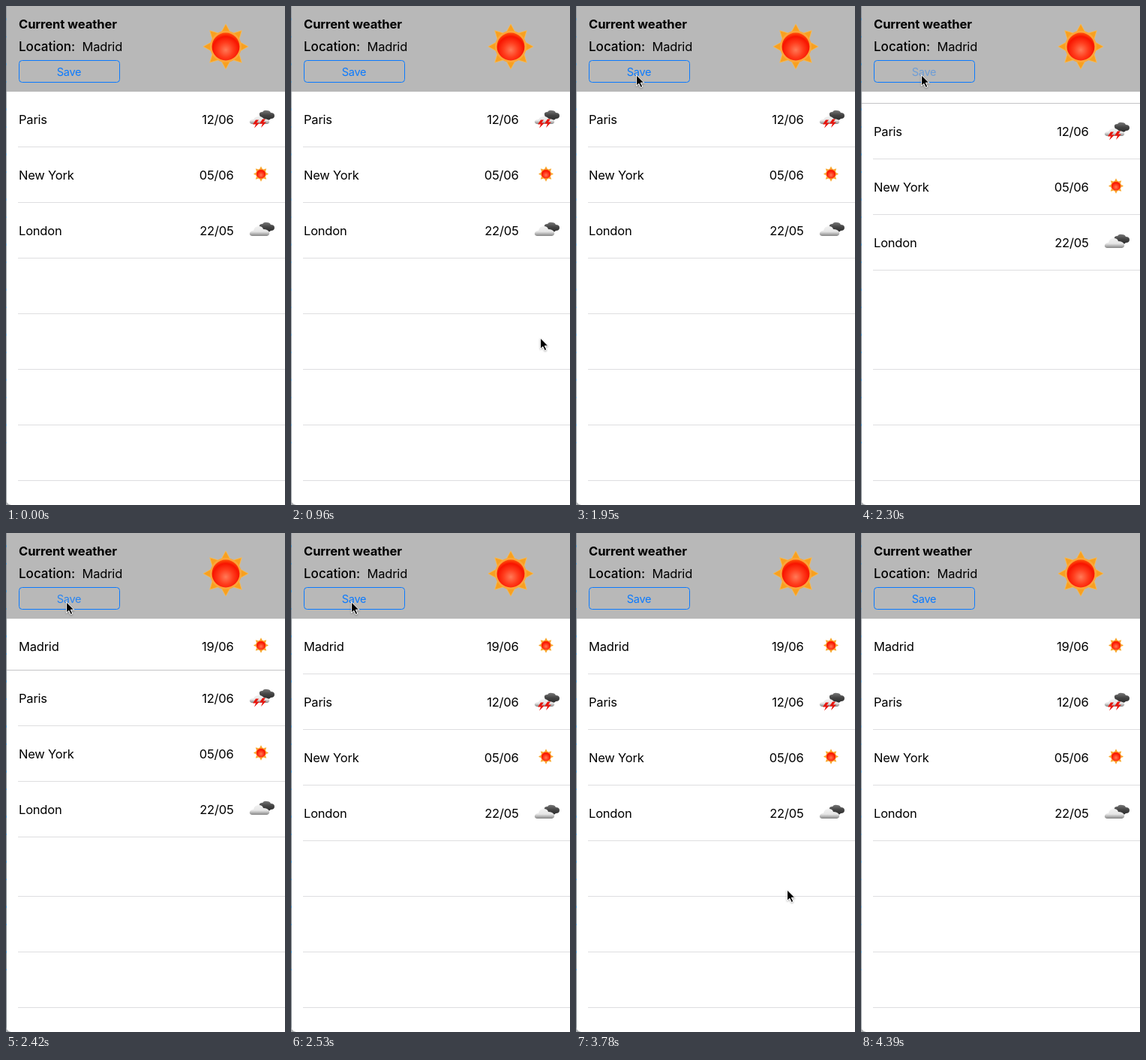
Animation, 372 px wide and 664 px high, one loop 4.49 s. Source, as an HTML page:

```html
<!DOCTYPE html>
<html lang="en">
<head>
<meta charset="utf-8">
<title>Weather list</title>
<style>
  html, body { margin: 0; width: 100%; height: 100%; overflow: hidden; background: #fff; }
  svg { display: block; width: 372px; height: 664px; }
  text { font: 400 16.5px Inter, Roboto, "Liberation Sans", sans-serif; letter-spacing: -.2px; fill: #000; }
  .title { font-weight: 700; font-size: 16.6px; letter-spacing: -.12px; }
  .label { font-weight: 500; font-size: 17px; letter-spacing: 0; }
  .date, .icon-end { text-anchor: end; }
  #save { font-size: 14.5px; letter-spacing: -.3px; text-anchor: middle; fill: #0a7aff; }
  .line { fill: #dedee0; }
</style>
</head>
<body>
<svg viewBox="0 0 372 664">
  <defs>
    <radialGradient id="glow" cx=".5" cy=".62" r=".6">
      <stop offset="0" stop-color="#ff7a58"/>
      <stop offset=".45" stop-color="#ff3c1c"/>
      <stop offset=".8" stop-color="#f81400"/>
      <stop offset="1" stop-color="#ff4a08"/>
    </radialGradient>
    <linearGradient id="dark" x2="0" y2="1">
      <stop offset="0" stop-color="#777"/>
      <stop offset=".5" stop-color="#444"/>
      <stop offset="1" stop-color="#2c2c2c"/>
    </linearGradient>
    <linearGradient id="pale" x2="0" y2="1">
      <stop offset="0" stop-color="#f2f2f2"/>
      <stop offset=".55" stop-color="#e6e6e6"/>
      <stop offset="1" stop-color="#858585"/>
    </linearGradient>
    <filter id="soft"><feGaussianBlur stdDeviation=".6"/></filter>
    <filter id="shade" x="-50%" y="-50%" width="200%" height="200%">
      <feDropShadow dx="0" dy="1" stdDeviation="1" flood-opacity=".35"/>
    </filter>

    <path id="rays" d="M0-30 5.5-20h-11zM0 30 5.5 20h-11z" fill="#f8a020" stroke="#fbbc50" stroke-width=".8"/>
    <g id="sun">
      <use href="#rays"/>
      <use href="#rays" transform="rotate(45)"/>
      <use href="#rays" transform="rotate(90)"/>
      <use href="#rays" transform="rotate(135)"/>
      <circle r="21" fill="#fba63a"/>
      <circle r="18.5" fill="url(#glow)"/>
    </g>
    <g id="small-sun" transform="translate(340 35.5) scale(.33)"><use href="#sun"/></g>
    <path id="back-cloud" fill="url(#dark)"
      d="M338 31q-1-4 4-4 2-3 6-2 4 0 5 3 5 0 5 4 0 4-5 4-2 3-6 1-3 1-4-2-4 0-5-4z"/>
    <g id="cloud">
      <use href="#back-cloud" y="1"/>
      <path fill="url(#pale)" d="M328 44q-4-1-3-4 1-3 5-3 1-6 7-6 5 0 6 4 6 0 8 4 1 4-3 5z"/>
    </g>
    <g id="storm">
      <use href="#back-cloud"/>
      <path fill="url(#pale)" d="M328 43q-4-1-3-4 1-2 5-2 2-4 7-4 5 0 6 3 6 0 8 3 1 3-3 4z"/>
      <path fill="#e8140c" d="M333 37.500l-4 6h4l-2 5 7-7h-4l3-4zM342 36.500l-4 6h4l-2 5.500 7-7.500h-4l3-4z"/>
    </g>
  </defs>

  <rect width="372" height="664" fill="#fff"/>
  <g id="empty"></g>
  <g id="added"></g>
  <g id="list"></g>

  <rect width="372" height="114" fill="#b8b8b8"/>
  <text class="title" x="17" y="30">Current weather</text>
  <text class="label" x="17" y="59.500">Location:</text>
  <text x="101.500" y="59.500">Madrid</text>
  <rect x="17.500" y="72.500" width="134" height="29" rx="4" fill="none" stroke="#0a7aff"/>
  <text id="save" x="84" y="92.500">Save</text>
  <use href="#sun" transform="translate(293 54)" filter="url(#soft)"/>

  <g id="edge">
    <path d="M.5 0V664" stroke="#8c9298"/>
    <path d="M.5 16V600" stroke="#4f93c4" stroke-dasharray="3 21 2 34"/>
  </g>
  <path d="M0 657q1 6 7 7H0z" fill="#a4a7aa"/>

  <g id="cursor" filter="url(#shade)">
    <path d="M.6.9V15.200l3.200-3 2.500 5.300 2.500-1.200-2.500-5.100h4.500z" stroke="#fff"/>
  </g>
</svg>
<script>
  const LOOP = 4490, ROW = 74, TOP = 114;
  const $ = id => document.getElementById(id);

  const line = (y, x = 16) => `<rect class="line" x="${x}" y="${y}" width="${372 - x}" height="1"/>`;
  const row = (i, city, date, icon) => `
    <g transform="translate(0 ${TOP + ROW * i})">
      <rect width="372" height="${ROW}" fill="#fff"/>
      <text x="17" y="42.500">${city}</text>
      <text class="date" x="303.500" y="42.500">${date}</text>
      <use href="#${icon}"/>
      ${line(ROW - 1)}
    </g>`;

  $('empty').innerHTML =
    `<g id="fourth">${line(409)}</g>` + [483, 557, 631].map(y => line(y)).join('');
  $('added').innerHTML = row(0, 'Madrid', '19/06', 'small-sun');
  $('list').innerHTML =
    row(0, 'Paris', '12/06', 'storm') +
    row(1, 'New York', '05/06', 'small-sun') +
    row(2, 'London', '22/05', 'cloud') +
    `<rect id="rim" y="${TOP - 1}" width="372" height="1" fill="#c4c4c6"/>`;

  // Bursts of motion: start, end, number of updates
  const bursts = [[960, 1480, 10], [1530, 1950, 7], [2120, 2530, 8], [3430, 3900, 9]];
  const snap = t => {
    for (const [a, b, n] of bursts) {
      const step = (b - a) / (n - 1);
      if (t >= a && t < b + step) return a + step * Math.min(n - 1, Math.floor((t - a) / step));
    }
    return t;
  };

  const part = (t, a, b) => Math.min(1, Math.max(0, (t - a) / (b - a)));
  const smooth = p => p * p * (3 - 2 * p);
  const mix = (a, b, p) => a + (b - a) * p;

  // Pointer legs: start, end, from x, y, to x, y
  const legs = [
    [960, 1480, 332, 441, 80, 107],
    [1480, 1950, 80, 107, 80, 91],
    [3430, 3900, 94, 105, 367, 645]
  ];
  const pointer = t => {
    if (t >= 1950 && t < 3430) return [80, 91];
    const [a, b, x0, y0, x1, y1] = legs.findLast(leg => t >= leg[0]);
    const p = smooth(part(t, a, b));
    return [Math.round(mix(x0, x1, p)), Math.round(mix(y0, y1, p))];
  };

  const show = (id, on) => $(id).setAttribute('visibility', on ? 'visible' : 'hidden');

  function draw(time) {
    const t = snap(time);
    const shift = Math.round(ROW * smooth(part(t, 2230, 2449)));
    $('list').setAttribute('transform', `translate(0 ${shift})`);
    show('rim', shift > 0 && shift < ROW);
    show('fourth', shift === 0);

    const pressed = t >= 2120 && t < 2530;
    $('save').setAttribute('opacity', pressed ? mix(.2, 1, part(t, 2230, 2460)) : 1);
    $('edge').setAttribute('opacity', t >= 2120 && t < 4390 ? 1 : .75);

    const visible = time >= 960 && time < 3960;
    show('cursor', visible);
    if (visible) $('cursor').setAttribute('transform', `translate(${pointer(t)})`);
  }

  const start = performance.now();
  function tick() {
    draw((performance.now() - start) % LOOP);
    requestAnimationFrame(tick);
  }
  tick();
</script>
</body>
</html>
```
